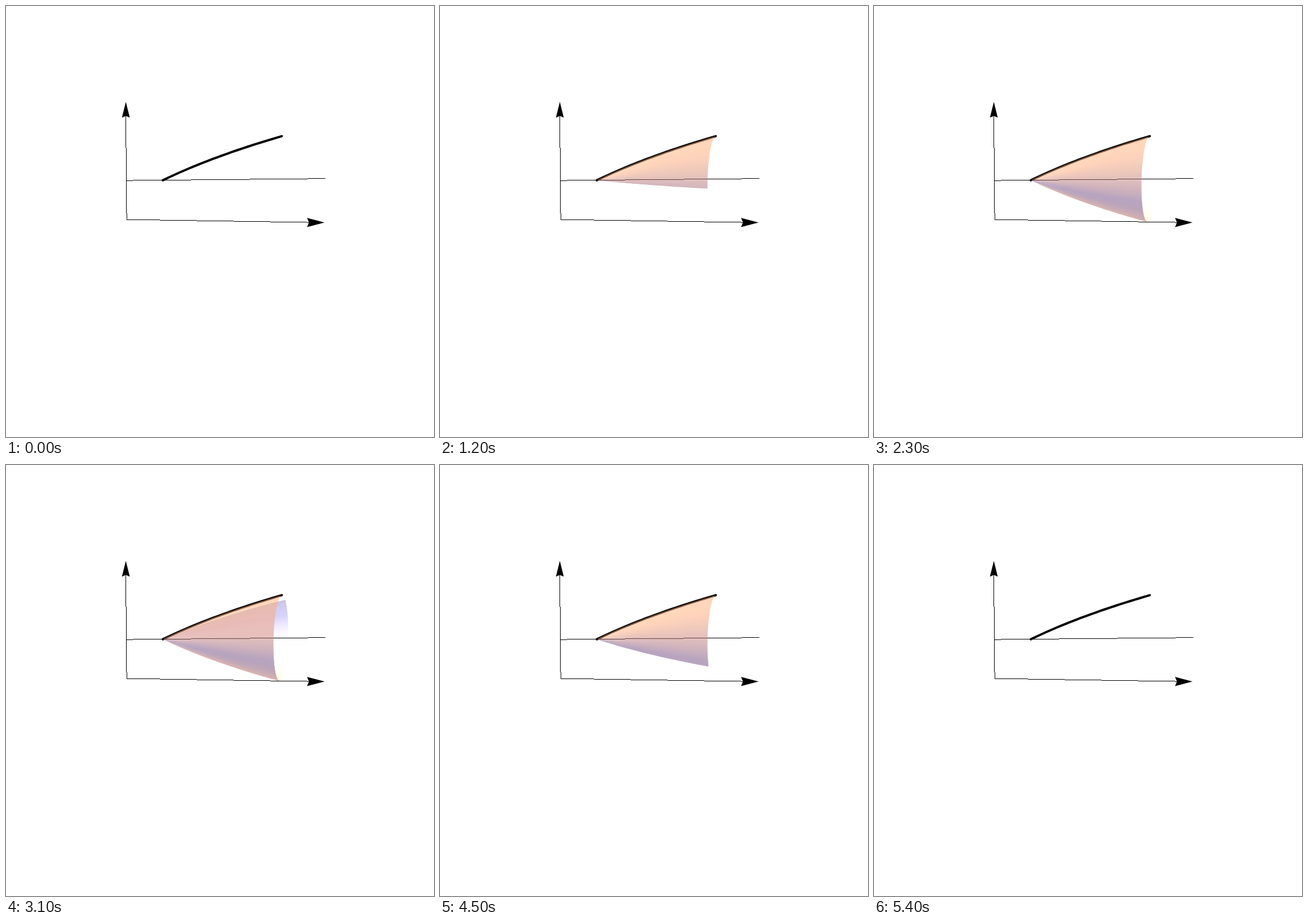
Write an HTML page with a canvas that moves like this. It is 745x751 px and loops after 6000 ms.

```html
<!DOCTYPE html>
<html lang="en">
<head>
<meta charset="utf-8">
<title>Surface of revolution</title>
<style>
  html, body { margin: 0; width: 100%; height: 100%; overflow: hidden; background: #fff; }
  canvas { display: block; }
</style>
</head>
<body>
<canvas id="stage" width="745" height="751"></canvas>
<script>
const W = 745, H = 751;
const LOOP = 6000, TICK = 100, STEP_DEG = 14.4, FOLD = 175;
const ctx = document.getElementById('stage').getContext('2d');
const layer = document.createElement('canvas');
layer.width = W;
layer.height = H;
const lctx = layer.getContext('2d');

const cosDeg = d => Math.cos(d * Math.PI / 180);
const sinDeg = d => Math.sin(d * Math.PI / 180);

// Each side is lit by an ambient tone and two coloured lamps
const OUTSIDE = {
  ambient: [115, 75, 128],
  lamps: [{ at: 30, rgb: [150, 100, -8] }, { at: 220, rgb: [100, 48, 0] }]
};
const INSIDE = {
  ambient: [115, 100, 140],
  lamps: [{ at: 210, rgb: [160, 145, 30] }, { at: 270, rgb: [70, 80, 120] }]
};

function shade({ ambient, lamps }, deg) {
  const rgb = ambient.map((base, i) => lamps.reduce(
    (sum, lamp) => sum + lamp.rgb[i] * Math.max(0, cosDeg(deg - lamp.at)), base));
  return `rgb(${rgb.map(v => Math.min(255, Math.round(v)))})`;
}

// Point on the surface: s runs from apex (0) to rim (1)
function point(s, deg) {
  const r = Math.log(1 + 0.7 * s) / Math.log(1.7);
  const c = cosDeg(deg), q = sinDeg(deg);
  return [
    273 + 205.3 * s + r * (1.7 * c - 12.8 * q),
    303.6 - 2 * s + r * (2.5 * q - 74.7 * c)
  ];
}

function trace(c, deg, back) {
  const n = 24;
  for (let i = 0; i <= n; i++) c.lineTo(...point((back ? n - i : i) / n, deg));
}

// Strips overlap on an opaque layer, so blending it leaves no seams
function sheet(from, to, side) {
  if (to <= from) return;
  lctx.clearRect(0, 0, W, H);
  for (let a = from; a < to; a += 1.5) {
    lctx.fillStyle = shade(side, a);
    lctx.beginPath();
    trace(lctx, a, false);
    trace(lctx, Math.min(a + 3, to), true);
    lctx.fill();
  }
  ctx.globalAlpha = 0.5;
  ctx.drawImage(layer, 0, 0);
  ctx.globalAlpha = 1;
}

// Hard-edged one pixel line
function hairline(x0, y0, x1, y1) {
  const n = Math.max(Math.abs(x1 - x0), Math.abs(y1 - y0));
  for (let i = 0; i <= n; i++) {
    ctx.fillRect(Math.floor(x0 + (x1 - x0) * i / n), Math.floor(y0 + (y1 - y0) * i / n), 1, 1);
  }
}

function arrowHead(x, y, angle, length, half) {
  ctx.save();
  ctx.translate(x, y);
  ctx.rotate(angle);
  ctx.beginPath();
  ctx.moveTo(0, 0);
  ctx.lineTo(-length, half);
  ctx.lineTo(-length * 0.89, 0);
  ctx.lineTo(-length, -half);
  ctx.fill();
  ctx.restore();
}

function drawLines() {
  ctx.fillStyle = ctx.strokeStyle = '#000';
  hairline(208.5, 190, 210.1, 372);
  hairline(210, 372.1, 530, 377.1);
  hairline(210, 304.1, 555, 300.7);
  arrowHead(208.6, 167, -Math.PI / 2, 27.5, 6.8);
  arrowHead(554.5, 377.2, 0, 30.5, 8);
  ctx.lineWidth = 4;
  ctx.lineCap = ctx.lineJoin = 'round';
  ctx.beginPath();
  trace(ctx, 0, false);
  ctx.stroke();
}

function draw(time) {
  const tick = Math.floor(time % LOOP / TICK);
  const turn = Math.max(0, Math.min(tick - 5, 54 - tick)) * STEP_DEG;
  ctx.fillStyle = '#fff';
  ctx.fillRect(0, 0, W, H);
  sheet(FOLD, turn, INSIDE);
  drawLines();
  sheet(0, Math.min(turn, FOLD), OUTSIDE);
}

const start = performance.now();
function loop() {
  draw(performance.now() - start);
  requestAnimationFrame(loop);
}
loop();
</script>
</body>
</html>
```
